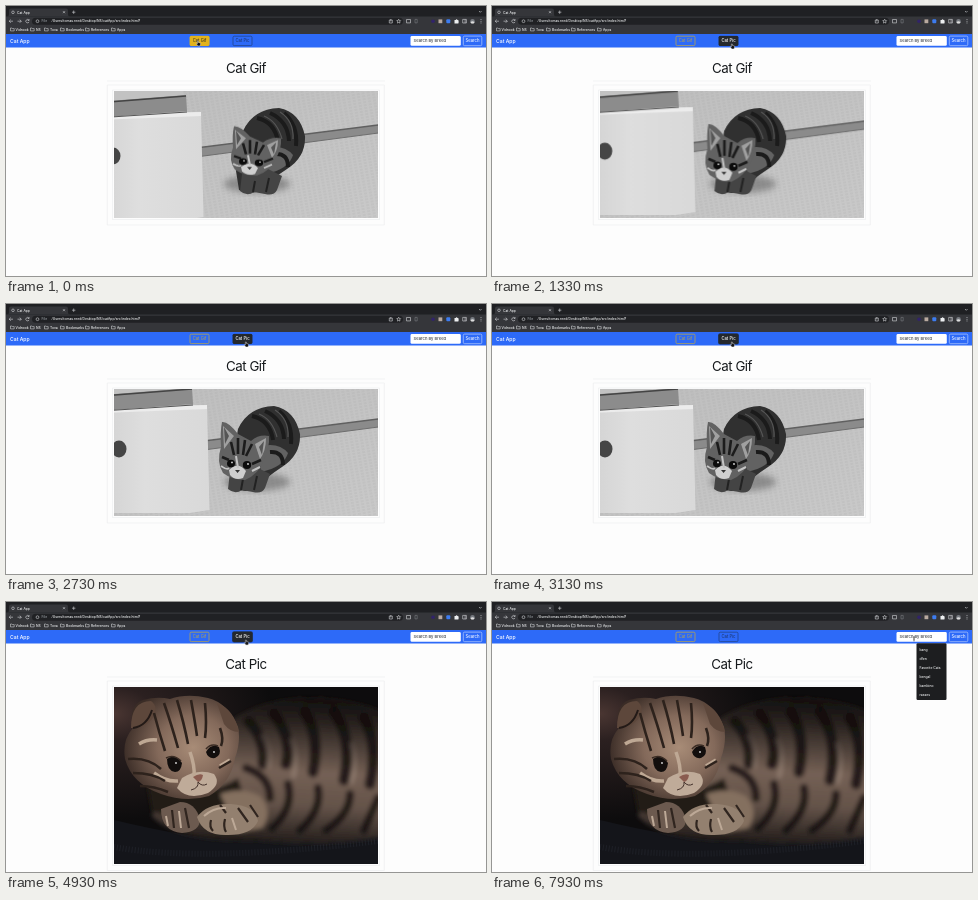
An HTML page that plays this animation: 480 by 270 pixels, repeating every 8 s.

```html
<!DOCTYPE html>
<html lang="en">
<head>
<meta charset="utf-8">
<title>Cat App</title>
<style>
html, body { margin: 0; width: 100%; height: 100%; overflow: hidden; background: #fdfdfd; }
svg { display: block; width: 100vw; height: 100vh; font-family: Inter, Roboto, sans-serif; }
.small { font-size: 3.35px; font-weight: 500; fill: #f1f3f4; }
.btn { font-size: 4.2px; text-anchor: middle; }
.title { font-size: 13.3px; font-weight: 400; letter-spacing: -.45px; text-anchor: middle; fill: #16191c; }
.icon { fill: none; stroke: #d4d6d9; stroke-width: .6; }
.frame { fill: none; stroke: #eceef0; stroke-width: .7; }

.gifPage, .picPage, .photo, .hand, .arrow, .beam, .menu, .caret, .focus { animation: 8s step-end infinite; }
.gifPage { animation-name: gifPage; }
.picPage { animation-name: picPage; }
.photo { animation-name: photo; }
.hand { animation-name: hand; }
.arrow { animation-name: arrow; }
.beam { animation-name: beam; }
.menu { animation-name: menu; }
.caret { animation-name: caret; }
.focus { animation-name: focus; }
@keyframes gifPage { 0% { opacity: 1 } 40.875%, 100% { opacity: 0 } }
@keyframes picPage { 0% { opacity: 0 } 40.875%, 100% { opacity: 1 } }
@keyframes photo { 0% { opacity: 0 } 59.125%, 100% { opacity: 1 } }
@keyframes hand { 0% { opacity: 1 } 3.6% { opacity: 0 } 7.8% { opacity: 1 } 64%, 100% { opacity: 0 } }
@keyframes arrow { 0% { opacity: 0 } 3.6% { opacity: 1 } 7.8% { opacity: 0 } 64% { opacity: 1 } 82.5%, 100% { opacity: 0 } }
@keyframes beam { 0% { opacity: 0 } 82.5%, 100% { opacity: 1 } }
@keyframes menu { 0% { opacity: 0 } 91.25%, 100% { opacity: 1 } }
@keyframes caret { 0% { opacity: 0 } 91.25% { opacity: 1 } 97.5%, 100% { opacity: 0 } }
@keyframes focus { 0% { opacity: 0 } 34.5% { opacity: 1 } 90%, 100% { opacity: 0 } }

.gifHover { animation: gifHover 8s linear infinite; }
.picHover { animation: picHover 8s linear infinite; }
@keyframes gifHover { 0%, 3.5% { opacity: 1 } 5.4%, 100% { opacity: 0 } }
@keyframes picHover { 0%, 9.2% { opacity: 0 } 11%, 64% { opacity: 1 } 66%, 100% { opacity: 0 } }

.cursor { animation: cursor 8s ease-in-out infinite; }
@keyframes cursor {
  0%, 2% { transform: translate(192px, 36px) }
  9%, 61.5% { transform: translate(240px, 39px) }
  69% { transform: translate(355px, 55px) }
  75%, 78% { transform: translate(413px, 49px) }
  83.5%, 100% { transform: translate(422px, 36.5px) }
}

/* parts of the looping clip drift by different amounts */
.drift { animation: drift 2s ease-in-out infinite; }
.crate { --x: -6px; --y: 5px; --s: 1; }
.floor { --x: 0px; --y: 4px; --s: 1; }
.body { --x: 5px; --y: 0px; --s: 1; }
.legs { --x: 12px; --y: 0px; --s: 1; }
.head { --x: 12px; --y: 20px; --s: .85; }
@keyframes drift {
  0%, 5%, 97%, 100% { transform: translate(var(--x), var(--y)) scaleY(var(--s)) }
  33%, 62% { transform: none }
}
</style>
</head>
<body>
<svg viewBox="0 0 480 270" preserveAspectRatio="none">
  <defs>
    <clipPath id="wide"><path d="M108 85h264v127h-264z"/></clipPath>
    <clipPath id="tall"><path d="M108 85h264v177h-264z"/></clipPath>
    <filter id="soft"><feGaussianBlur stdDeviation=".45"/></filter>
    <filter id="fur"><feGaussianBlur stdDeviation="2"/></filter>
    <filter id="blur" x="-20%" y="-20%" width="140%" height="140%"><feGaussianBlur stdDeviation="3"/></filter>
    <pattern id="weave" width="5" height="3" patternUnits="userSpaceOnUse" patternTransform="rotate(-10)">
      <path d="M0 1h3" stroke="#8b8b8b" stroke-opacity=".28" stroke-width=".8"/>
    </pattern>
    <linearGradient id="ground" x2="1" y2="1">
      <stop stop-color="#bdbdbd"/><stop offset="1" stop-color="#c9c9c9"/>
    </linearGradient>
    <linearGradient id="side" x2="1">
      <stop stop-color="#d2d2d2"/><stop offset=".4" stop-color="#dedede"/><stop offset="1" stop-color="#d9d9d9"/>
    </linearGradient>
    <radialGradient id="dusk" cx="0" cy=".15" r=".6">
      <stop stop-color="#4a3632"/><stop offset=".25" stop-color="#2b2020"/><stop offset="1" stop-color="#0d0c0d"/>
    </radialGradient>
    <linearGradient id="shade" gradientUnits="userSpaceOnUse" x1="300" y1="94" x2="292" y2="246">
      <stop stop-color="#0e0c0c"/><stop offset=".18" stop-color="#0e0c0c" stop-opacity=".75"/>
      <stop offset=".5" stop-color="#0e0c0c" stop-opacity=".1"/><stop offset=".72" stop-color="#0e0c0c" stop-opacity=".25"/>
      <stop offset="1" stop-color="#0e0c0c" stop-opacity=".9"/>
    </linearGradient>
    <radialGradient id="face" cx=".6" cy=".5" r=".62">
      <stop stop-color="#a88c77"/><stop offset=".5" stop-color="#83695a"/><stop offset="1" stop-color="#3a2c26"/>
    </radialGradient>
    <path id="folder" d="M0 0h1.4l.5.6h1.8v2.3h-3.7z" fill="none" stroke="#e6e8ea" stroke-width=".5"/>
  </defs>

  <rect width="480" height="270" fill="#fdfdfd"/>

  <!-- browser -->
  <rect width="480" height="28" fill="#35363a"/>
  <rect width="480" height="10.5" fill="#1f2023"/>
  <path d="M1 10.5q2 0 2-2v-4q0-2 2-2h55q2 0 2 2v4q0 2 2 2z" fill="#35363a"/>
  <circle cx="7" cy="6.3" r="1.3" class="icon"/>
  <text x="11" y="7.6" class="small">Cat App</text>
  <path class="icon" d="M57 5.2l2 2m0-2l-2 2M66 6.2h3.4m-1.7-1.7v3.4M473 5l1.3 1.3 1.3-1.3"/>
  <rect x="26" y="11.8" width="371" height="7" rx="3.5" fill="#202124"/>
  <path class="icon" d="M7 15.2h-3.8m1.6-1.6l-1.6 1.6 1.6 1.6M11.5 15.2h3.8m-1.6-1.6l1.6 1.6-1.6 1.6M23 14.3a1.7 1.7 0 1 0 .1 1.6m0-2.8v1.4h-1.4"/>
  <circle cx="31.5" cy="15.2" r="1.4" class="icon"/>
  <text x="35.5" y="16.4" class="small" style="fill:#9aa0a6">File</text>
  <text x="45.5" y="16.4" class="small">/Users/tomas.reed/Desktop/NS/catApp/src/index.html?</text>
  <path class="icon" d="M383.3 14h3v3h-3zm1.5-1v2.5M392.7 13.2l.6 1.3 1.4.2-1 1 .2 1.4-1.2-.7-1.2.7.2-1.4-1-1 1.4-.2zM400.5 13.5h4v3.4h-4z"/>
  <path d="M409 13.4h2.2v3.5h-2.2z" fill="none" stroke="#85888c" stroke-width=".5"/>
  <circle cx="427" cy="15.3" r="1.8" fill="#31236a"/>
  <rect x="432.5" y="13.4" width="3.8" height="3.8" fill="#b9aaa0"/>
  <rect x="440.3" y="13.2" width="4" height="4" rx="1" fill="#3d7cf0"/>
  <path d="M448.5 14h1.3a.8.8 0 0 1 1.6 0h1v1.2a.8.8 0 0 1 0 1.4v1h-3.9z" fill="#eceef0"/>
  <path class="icon" d="M456.7 13.4h3.7v3.6h-3.7zm2.4 0v3.6"/>
  <circle cx="466.5" cy="15.2" r="2.3" fill="#777b81"/>
  <path d="M464.4 16.2q2-2 4.2 0l-1 1.2h-2.2z" fill="#ddd"/>
  <path d="M475 13.2v4.3" stroke="#d4d6d9" stroke-width=".8" stroke-dasharray=".8 .9"/>
  <use href="#folder" x="4.5" y="22"/><use href="#folder" x="24.5" y="22"/><use href="#folder" x="38.5" y="22"/>
  <use href="#folder" x="54.5" y="22"/><use href="#folder" x="79.5" y="22"/><use href="#folder" x="105.5" y="22"/>
  <g class="small">
    <text x="9.5" y="24.6">Vidnook</text><text x="30" y="24.6">NS</text><text x="44" y="24.6">Tova</text>
    <text x="60" y="24.6">Bookmarks</text><text x="85" y="24.6">References</text><text x="111" y="24.6">Apps</text>
  </g>

  <!-- navigation -->
  <rect y="28" width="480" height="13.5" fill="#2d6af8"/>
  <text x="4" y="36.5" font-size="5.1" font-weight="500" fill="#fff">Cat App</text>
  <rect x="184" y="30.2" width="19" height="9.4" rx="1.2" fill="none" stroke="#b5a250" stroke-width=".8"/>
  <text x="193.5" y="36.4" class="btn" fill="#b9a548">Cat Gif</text>
  <g class="gifHover">
    <rect x="183.8" y="29.9" width="19.6" height="10" rx="1.3" fill="#e2b21c"/>
    <text x="193.5" y="36.4" class="btn" fill="#222">Cat Gif</text>
  </g>
  <rect x="227" y="30.2" width="19" height="9.4" rx="1.2" fill="none" stroke="#21417f" stroke-width=".7"/>
  <rect class="focus" x="226.7" y="29.9" width="19.6" height="10" rx="1.4" fill="none" stroke="#203762" stroke-width="1.2"/>
  <text x="236.5" y="36.4" class="btn" fill="#1d3261">Cat Pic</text>
  <g class="picHover">
    <rect x="226.7" y="29.9" width="19.6" height="10" rx="1.3" fill="#24282d"/>
    <text x="236.5" y="36.4" class="btn" font-weight="500" fill="#fff">Cat Pic</text>
  </g>
  <rect x="404.5" y="30" width="50.3" height="9.8" rx="1.4" fill="#fff"/>
  <text x="407.6" y="36.4" font-size="4.1" font-weight="500" fill="#3c4147">Search By Breed</text>
  <path class="caret" d="M407.4 32.4v5" stroke="#222" stroke-width=".5"/>
  <rect x="457.3" y="30.1" width="18.5" height="9.6" rx="1.3" fill="none" stroke="#b9cdfb" stroke-width=".7"/>
  <text x="466.5" y="36.4" class="btn" font-weight="500" fill="#f5f8ff">Search</text>

  <path d="M101 75h278" class="frame"/>

  <!-- looping clip -->
  <g class="gifPage">
    <text x="240" y="67" class="title">Cat Gif</text>
    <path class="frame" d="M101.3 79v140h277v-140zM106.5 84h267v129.5h-267z"/>
    <g clip-path="url(#wide)">
      <path d="M108 85h264v128h-264z" fill="url(#ground)"/>
      <path d="M108 85h264v128h-264z" fill="url(#weave)"/>
      <g class="drift floor" filter="url(#soft)">
        <path d="M190 138L380 114v8L190 147z" fill="#8b8b8b"/>
        <path d="M190 138L380 114" stroke="#606060" stroke-width="1.4"/>
        <path d="M190 147L380 122" stroke="#6d6d6d"/>
      </g>
      <g class="drift crate">
        <path d="M96 104l105-3 2.5 105-20 3H96z" fill="url(#side)"/>
        <path d="M96 104l105-3v4l-105 4z" fill="#ececec"/>
        <path d="M96 76h85l4 10-89 7z" fill="#c2c2c2"/>
        <path d="M96 91l90-7 1 16-91 7z" fill="#8c8c8c"/>
        <path d="M96 92l90-7" stroke="#444" stroke-width="1.6"/>
        <path d="M96 107l91-6" stroke="#555" stroke-width="1.2"/>
        <ellipse cx="113" cy="145" rx="7.5" ry="8.5" fill="#454545"/>
      </g>
      <ellipse cx="251" cy="178" rx="33" ry="9" fill="#666" opacity=".6" filter="url(#blur)"/>
      <g class="drift body" filter="url(#soft)">
        <path d="M232 125Q242 103 268 102Q289 106 294 130Q295 151 276 163Q259 174 250 184Q240 190 228 184L225 165z" fill="#303030"/>
        <path d="M252 143q20-6 30 6-4 14-27 19z" fill="#626262"/>
        <path d="M246 112q18 4 21 24M259 107q18 8 19 28M273 107q14 12 12 33M264 148q13-1 13 13" fill="none" stroke="#1b1b1b" stroke-width="4"/>
        <path d="M253 110q13 5 18 23M269 106q14 9 13 27" fill="none" stroke="#555" stroke-width="1.2"/>
      </g>
      <g class="drift legs" filter="url(#soft)">
        <path d="M224 168l-2 17q7 6 14 1l11 2q9 2 12-4l5-14-16-8z" fill="#444"/>
        <path d="M237 175l-2 11M251 172l-3 14" stroke="#222" stroke-width="2"/>
      </g>
      <g class="drift head" filter="url(#soft)">
        <path d="M216 118Q222 117 232 130L245 137Q253 130 263 132Q264 145 257 157Q253 170 239 176Q226 176 217 169Q210 158 215 143Q214 128 216 118z" fill="#626262"/>
        <path d="M217 122l11 10-10 13zM260 134l-11 6 5 15q6-8 6-21z" fill="#a0a0a0"/>
        <path d="M218 123l5 9-4 8zM258 137l-5 6 3 8z" fill="#555"/>
        <path d="M225 138l3 13M232 134l0 16M239 136l-2 15M246 140l-6 12M216 153l7 3M255 156l-9 4" stroke="#1c1c1c" stroke-width="2.6" fill="none"/>
        <path d="M223 166q9-9 17 1l-3 7q-8 3-13-3z" fill="#cfcfcf"/>
        <path d="M215 162q6 4 8 2M246 167l8-4M230 152l2 12" stroke="#c4c4c4" stroke-width="2"/>
        <ellipse cx="225" cy="159.5" rx="4" ry="3.8" fill="#0b0b0b"/>
        <ellipse cx="241" cy="161" rx="4.2" ry="4" fill="#0b0b0b"/>
        <circle cx="226" cy="158.4" r=".9" fill="#ddd"/><circle cx="242" cy="160" r=".9" fill="#ddd"/>
        <path d="M229 166h5l-2.4 3z" fill="#333"/>
      </g>
    </g>
  </g>

  <!-- still picture -->
  <g class="picPage">
    <text x="240" y="67" class="title">Cat Pic</text>
    <path class="frame" d="M101.3 79h277v189.5h-277zM106.5 84h267v179.5h-267z"/>
    <g class="photo" clip-path="url(#tall)">
      <path d="M108 85h264v178h-264z" fill="url(#dusk)"/>
      <path d="M100 216Q180 236 230 238T390 226v45H100z" fill="#14151a"/>
      <path d="M108 245q90 16 264-6" fill="none" stroke="#1e2027" stroke-width="6" stroke-dasharray="1 2"/>
      <g filter="url(#fur)">
        <path id="flank" d="M216 126Q250 98 300 96Q350 96 390 116V232Q318 246 252 238Q170 240 146 214L160 178z" fill="#806a5d"/>
        <g fill="none" stroke="#2b211d" stroke-linecap="round">
          <path d="M243 120q17 18 14 42M268 112q19 26 12 50M299 110q15 24 8 60M328 110q19 26 10 68M358 116q15 26 6 66" stroke-width="11"/>
          <path d="M240 166q24 8 24 30M282 182q6 24-16 44M312 186q4 22-18 42M344 192q0 20-24 36M372 196l-14 32" stroke-width="8"/>
        </g>
        <path d="M256 132q10 16 6 34M285 136q8 20 2 40M345 140q7 20 0 42" fill="none" stroke="#b09a8a" stroke-opacity=".55" stroke-width="5"/>
        <path d="M216 126Q250 98 300 96Q350 96 390 116V232Q318 246 252 238Q170 240 146 214L160 178z" fill="url(#shade)"/>
        <path d="M140 176q40 30 92 0l8 26-44 16-50-8z" fill="#211a18"/>
        <path d="M214 192q22-8 40 2 14 16 2 32l-24 4z" fill="#84705f"/>
      </g>
      <g filter="url(#soft)">
        <path d="M155 207q0 22 21 24 18-1 18-14-5-17-20-17z" fill="#6c5a4f"/>
        <path d="M191 215q10-14 34-13 25 2 27 17-6 14-30 14-25 1-31-18z" fill="#93806f"/>
        <path d="M166 208l2 18M179 206l4 20M205 218q-2 7 2 11M219 217q-2 8 1 13M232 206l10 14M244 203l8 12M214 203l6 8" stroke="#30251f" stroke-width="2.2" fill="none"/>
        <path d="M160 214l2 10M173 209l2 17M198 214q10-9 22-8M226 216l4 12" stroke="#bda997" stroke-width="2" fill="none"/>
        <path d="M119 157Q116 138 127 126Q122 104 137 98Q151 94 164 97Q181 91 202 96Q222 101 232 125Q235 140 229 156Q225 181 203 194Q180 201 155 192Q126 182 119 157z" fill="url(#face)"/>
        <path d="M125 126q0-27 20-27 9 7 1 18-8 10-21 9zM211 101q17 6 22 29-9 0-15-8z" fill="#5d473b"/>
        <path d="M127 126q14-2 19-18" fill="none" stroke="#231a17" stroke-width="2"/>
        <path d="M176 176q16-10 32-4 8 10-6 19-20 8-31-5z" fill="#bfab99"/>
        <path d="M184 150q5 14 4 24M148 171q12 9 24 8M214 164l10-6M133 142q8-5 18-4" fill="none" stroke="#bea894" stroke-width="3.5"/>
        <path d="M158 101q7 20 14 45M171 98q7 23 11 44M185 98q4 22 6 36M199 101q2 21 0 35M148 111q5 19 11 38M122 157q20-2 33 10M127 171q20 0 32 8M134 184q14 0 28 6M214 126q4 11 1 18M225 159l-12 7" fill="none" stroke="#2d221c" stroke-width="2.6"/>
        <path d="M161 157q8-6 15 4-1 9-7 9-8-1-8-13zM200 150q5-9 13-5 3 8-4 11-7 1-9-6z" fill="#120e0d"/>
        <path d="M160 156q8-4 15 3M200 147q5-6 12-3" fill="none" stroke="#3a2c24" stroke-width="1.6"/>
        <circle cx="170" cy="161" r=".9" fill="#ddd"/><circle cx="208" cy="150" r=".9" fill="#ddd"/>
        <path d="M187 175q6-4 10-2-1 6-5 7z" fill="#8a5c50"/>
        <path d="M192 180q1 6-7 8m7-8q4 5 9 2" fill="none" stroke="#43312b"/>
      </g>
    </g>
  </g>

  <g class="menu">
    <rect x="424.5" y="41.3" width="30" height="56.7" rx="1.2" fill="#1d1e20"/>
    <g class="small">
      <text x="427.5" y="48.8">bang</text><text x="427.5" y="57.8">dfen</text><text x="427.5" y="66.8">Favorite Cats</text>
      <text x="427.5" y="75.8">bengal</text><text x="427.5" y="84.8">bambino</text><text x="427.5" y="93.8">rasses</text>
    </g>
  </g>

  <g class="cursor" stroke="#fff" stroke-width=".4">
    <path class="hand" d="M-.6-1q.6-.6 1 0v1.5l1.9.4q.6.5.2 1.5l-.5 1.5h-2.2l-1.6-2.2q0-.6 1.2 0z" fill="#111"/>
    <path class="arrow" d="M0 0v3.8l.9-.8.6 1.4.7-.4-.6-1.3h1.3z" fill="#111"/>
    <path class="beam" d="M-1-2q1 0 1 .6v3q0 .6 1 .6M1-2q-1 0-1 .6v3q0 .6-1 .6" fill="none" style="stroke:#222;stroke-width:.5"/>
  </g>
</svg>
</body>
</html>
```
